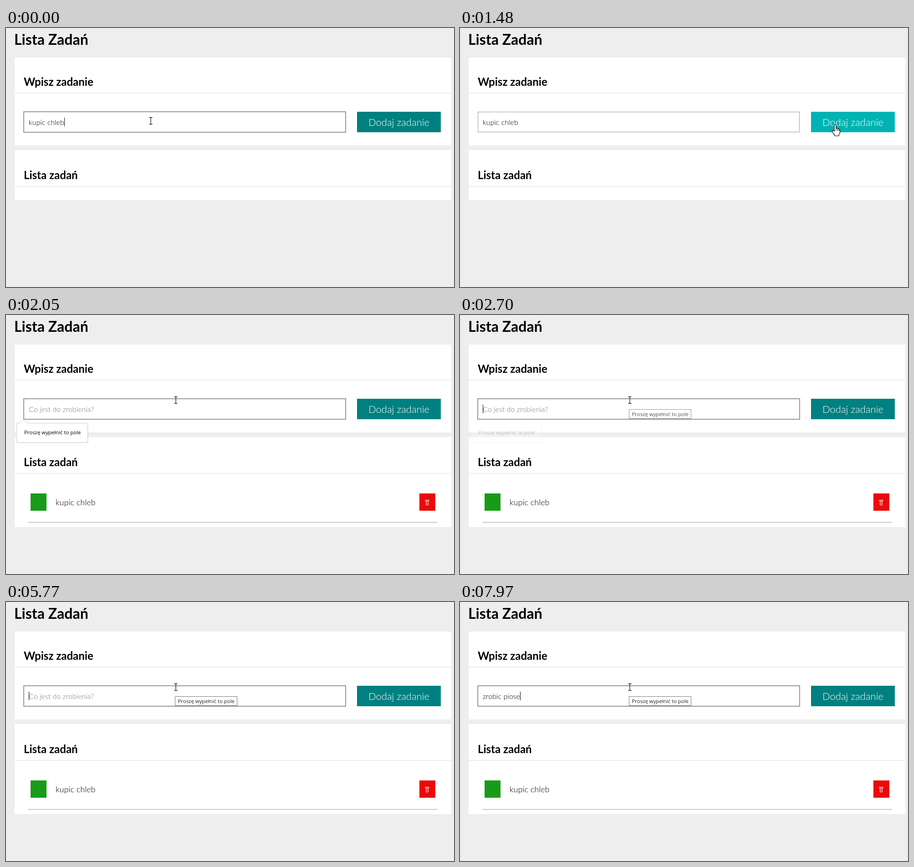
These frames come from a looping animation (984 by 569 pixels, 8000 ms). An HTML page:

```html
<!DOCTYPE html>
<html lang="pl">
<head>
<meta charset="utf-8">
<title>Lista Zadań</title>
<style>
  html, body { margin: 0; width: 100%; height: 100%; overflow: hidden; background: #eee; }
  svg { display: block; width: 984px; height: 569px; }
  text { font-family: Lato, sans-serif; white-space: pre; }
  .h1 { font-size: 32px; font-weight: 700; }
  .h2 { font-size: 24px; font-weight: 700; }
  .light { font-weight: 300; font-size: 16px; }
  .ui { font-family: "Open Sans", "Noto Sans", sans-serif; font-size: 11.4px; }
  .outlined { fill: #fff; stroke: #000; stroke-linejoin: round; }
</style>
</head>
<body>
<svg viewBox="0 0 984 569">
  <rect width="984" height="569" fill="#eee"/>
  <text class="h1" x="18" y="37">Lista Zadań</text>

  <rect x="19" y="65" width="959" height="193" fill="#fff"/>
  <text class="h2" x="39" y="127">Wpisz zadanie</text>
  <path d="M19 143H978" stroke="#eee" stroke-width="2"/>
  <rect id="field" fill="#fff" stroke="#999"/>
  <text id="value" class="light" x="50" y="213"></text>
  <rect id="caret" y="197" width="1" height="19"/>
  <rect id="button" x="771" y="184" width="184" height="45"/>
  <text class="light" x="863" y="215" text-anchor="middle" fill="#fff" style="font-size:22px">Dodaj zadanie</text>

  <rect id="list" x="19" y="268" width="959" fill="#fff"/>
  <text class="h2" x="39" y="332">Lista zadań</text>
  <path d="M19 348H978" stroke="#eee" stroke-width="2"/>
  <g id="task">
    <rect x="54" y="392" width="35" height="38" fill="#189b18"/>
    <text class="light" x="109" y="418" style="font-size:18px">kupic chleb</text>
    <rect x="908" y="392" width="35" height="38" fill="#eb0909"/>
    <path d="M921 409V406.500H929V409M922.500 408.500V417.500H927.500V408.500M925 409V416M921.500 408.500H928.500" fill="none" stroke="#fff" stroke-width=".9"/>
    <path d="M49 455.500H948" stroke="#999"/>
  </g>

  <rect id="suggestions" x="39.500" y="230.500" width="708" height="23" fill="#fff" stroke="#ccc"/>
  <g id="bubble">
    <path d="M24.500 239H180.500V281.500H24.500Z" fill="#000" opacity=".09"/>
    <path d="M23.500 237.500H30L38.500 230L47 237.500H179.500V280H23.500Z" fill="#fff" stroke="#cfcfcf"/>
    <text class="ui" x="40" y="262">Proszę wypełnić to pole</text>
  </g>
  <g id="tooltip">
    <rect x="371.500" y="207.500" width="136" height="20" fill="#fff" stroke="#767676"/>
    <text class="ui" x="377.500" y="222" fill="#222">Proszę wypełnić to pole</text>
  </g>

  <g id="beam">
    <path d="M-3.500 -7.500H-1L0 -6.500L1 -7.500H3.500M0 -7V7M-3.500 7.500H-1L0 6.500L1 7.500H3.500" fill="none" stroke="#222" stroke-width="1.300"/>
  </g>
  <path id="arrow" class="outlined" d="M0 0V16L3.700 12.500L6.200 18.500L8.800 17.400L6.300 11.600H11.500Z"/>
  <g id="hand">
    <path class="outlined" stroke-width="1.200" d="M-2 14V1.500Q-2 -.5 0 -.5T2 1.500V8Q2.500 6.500 4 7T5.500 9Q6 7.700 7.300 8.200T8.500 10Q10.500 9.200 10.500 12V17Q10 20 8 22V24H-1V22Q-4 19 -6.500 14.500Q-7 12 -4.500 12Z"/>
    <path d="M2 8V13M5.500 9V13M8.500 10V13" stroke="#000"/>
  </g>
</svg>
<script>
const LOOP = 8000;
const BLUR = 1380, ADDED = 1510;
const el = {};
document.querySelectorAll('[id]').forEach(node => el[node.id] = node);

const progress = (t, from, to) => Math.min(1, Math.max(0, (t - from) / (to - from)));
const ease = p => p * p * (3 - 2 * p);
const mix = (a, b, p) => a + (b - a) * p;
const between = (t, from, to) => t >= from && t < to;
const show = (node, on) => node.style.display = on ? '' : 'none';
const set = (node, attrs) => {
  for (const name in attrs) node.setAttribute(name, attrs[name]);
};

// Each switch flips the caret, which starts visible.
const caretSwitches = [270, 800, BLUR, ADDED, 2050, 2560, 3100, 3660, 4170, 4740, 5240, 5770, 6810, 7110];
const typed = 'zrobic piose';
const keyTimes = [5830, 6070, 6200, 6330, 6470, 6610, 6810, 7270, 7470, 7670, 7870, 7970];

function pointer(t) {
  if (t < ADDED) {
    const p = ease(progress(t, 270, 850));
    return [mix(318, 824, p), mix(204, 213, p) + 16 * Math.sin(Math.PI * p)];
  }
  const p = ease(progress(t, 1550, 1850));
  return [mix(824, 372, p) + progress(t, 2010, 2050), mix(213, 187, p) - 18 * Math.sin(Math.PI * p)];
}

function draw(t) {
  const added = t >= ADDED;
  const focused = !between(t, BLUR, ADDED);
  set(el.field, focused
    ? { x: 39, y: 184, width: 707, height: 45, 'stroke-width': 2 }
    : { x: 39.5, y: 184.5, width: 706, height: 44, 'stroke-width': 1 });

  const count = keyTimes.filter(k => t >= k).length;
  const text = added ? typed.slice(0, count) : 'kupic chleb';
  el.value.textContent = text || 'Co jest do zrobienia?';
  set(el.value, { fill: text ? '#000' : '#757575' });
  const width = text ? el.value.getComputedTextLength() : 0;
  set(el.caret, { x: Math.round(50 + width) });
  show(el.caret, caretSwitches.filter(s => t >= s).length % 2 === 0);

  show(el.task, added);
  set(el.list, { height: added ? 198 : 110 });

  const [x, y] = pointer(t);
  const kind = x < 747 ? 'beam' : x < 771 ? 'arrow' : 'hand';
  for (const name of ['beam', 'arrow', 'hand']) show(el[name], name === kind);
  set(el[kind], { transform: `translate(${Math.round(x)} ${Math.round(y)})` });

  const hover = added ? 1 - progress(t, 1620, 1780) : progress(t, 600, 780);
  const level = Math.round(mix(128, 179, hover));
  set(el.button, { fill: `rgb(0,${level},${level})` });

  set(el.bubble, { opacity: progress(t, 1640, 1740) * (1 - progress(t, 2560, 2740)) });
  set(el.tooltip, { opacity: progress(t, 2560, 2740) });
  set(el.suggestions, { opacity: progress(t, 5830, 5900) * (1 - progress(t, 6330, 6470)) });
}

function frame(now) {
  draw(now % LOOP);
  requestAnimationFrame(frame);
}
draw(0);
requestAnimationFrame(frame);
</script>
</body>
</html>
```
